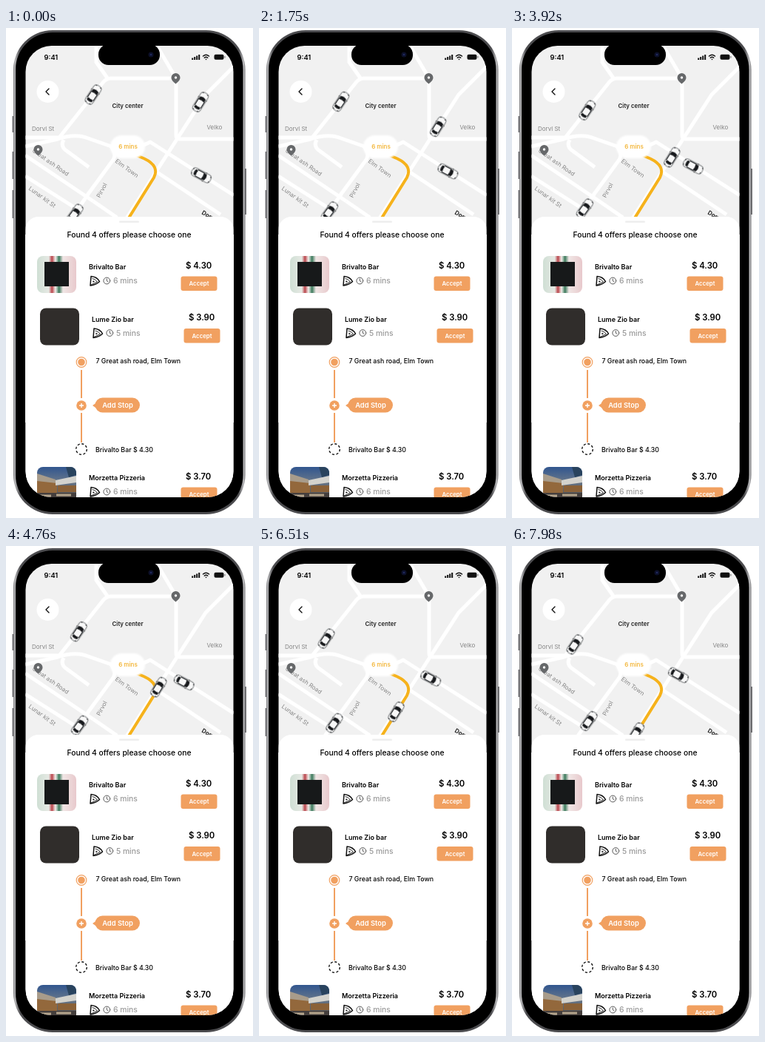
Animation, 334 px wide and 662 px high, one loop 8000 ms. Source, as an HTML page:

```html
<!DOCTYPE html>
<html lang="en">
<head>
<meta charset="utf-8">
<title>Delivery offers</title>
<style>
  html, body { margin: 0; width: 100%; height: 100%; overflow: hidden; background: #fff; }
  svg { display: block; width: 100%; height: 100%; font-family: Inter, Roboto, sans-serif; font-weight: 500; }
  .road { fill: none; stroke: #fff; stroke-width: 5; stroke-linejoin: round; }
  .street { font-size: 8px; font-weight: 400; fill: #858585; }
  .near { font-weight: 600; fill: #111; }
  .name { font-size: 9px; font-weight: 600; }
  .mins { font-size: 10.3px; fill: #999; }
  .price { font-size: 11.3px; font-weight: 600; }
  .label { font-size: 8.8px; }
  .white { fill: #fff; font-weight: 600; }
  .line { fill: none; stroke: #111; stroke-linecap: round; stroke-linejoin: round; }

  .car { animation: drive 8s -1ms infinite; }
  @keyframes drive {
    0% { transform: translate(var(--from)); animation-timing-function: steps(114, end); }
    99.75%, 100% { transform: translate(var(--to)); }
  }
  .north { --from: 118px, 90px; --to: 85px, 133px; }
  .east { --from: 263px, 100px; --to: 168px, 252px; }
  .south { --from: 264px, 199px; --to: 225px, 174.5px; }
  .west { --from: 93px, 251px; --to: 104px, 236.5px; }
</style>
</head>
<body>
<svg viewBox="0 0 334 662">
  <defs>
    <clipPath id="screen"><rect x="26.500" y="24" width="281" height="610" rx="35"/></clipPath>
    <clipPath id="thumb"><rect x="42" y="308" width="53" height="50" rx="8"/></clipPath>
    <linearGradient id="rim">
      <stop offset="0" stop-color="#6d6d70"/><stop offset=".006" stop-color="#b9b9bb"/>
      <stop offset=".03" stop-color="#4c4c4f"/><stop offset=".97" stop-color="#4c4c4f"/>
      <stop offset=".994" stop-color="#b9b9bb"/><stop offset="1" stop-color="#6d6d70"/>
    </linearGradient>
    <linearGradient id="stripes">
      <stop offset="0" stop-color="#cfdfd4"/><stop offset=".3" stop-color="#e6e9e4"/>
      <stop offset=".38" stop-color="#b9434a"/><stop offset=".47" stop-color="#f3efec"/>
      <stop offset=".56" stop-color="#3c7a5c"/><stop offset=".66" stop-color="#f0e6e5"/>
      <stop offset="1" stop-color="#e8c9cc"/>
    </linearGradient>
    <linearGradient id="evening" x2="0" y2="1">
      <stop offset="0" stop-color="#31568f"/><stop offset=".4" stop-color="#66768a"/>
      <stop offset="1" stop-color="#4a4039"/>
    </linearGradient>
    <filter id="soft" x="-20%" y="-20%" width="140%" height="140%"><feGaussianBlur stdDeviation="1"/></filter>

    <g id="car">
      <path d="M-6.6-5h1.4M5.2-5h1.4" stroke="#222" stroke-width="1.6"/>
      <rect x="-5.8" y="-14" width="11.6" height="28" rx="4" fill="#f8f8f8" stroke="#55585b" stroke-width=".8"/>
      <path d="M-4.8-6Q0-9.2 4.8-6L3.7-1.8Q0-3-3.7-1.8Z" fill="#17191c"/>
      <path d="M-4.2 9.8Q0 11.8 4.2 9.8L3.5 6.6Q0 7.4-3.5 6.6Z" fill="#17191c"/>
      <path d="M-4.7-3.8V7.6M4.7-3.8V7.6" stroke="#24272a" stroke-width="1.2"/>
      <path d="M-4.4-12.3l1.8-.9M4.4-12.3l-1.8-.9M-4.3 12.5l2 .7M4.3 12.5l-2 .7" stroke="#3a3c3f" stroke-width="1.1"/>
    </g>
    <g id="pin" fill="#66686a">
      <path d="M0 7.5C-3.2 4.6-6 2.4-6-1A6 6 0 0 1 6-1C6 2.4 3.2 4.6 0 7.5"/>
      <circle cy="-1" r="1.7" fill="#fff"/>
    </g>
    <g id="offer">
      <g class="line">
        <path d="M115 335.500Q123 336 126.500 342.500Q122 347 114 348Z" stroke-width="1.500"/>
        <path d="M117 338.500Q121.500 339.500 123.500 343L115 347" stroke-width=".9"/>
        <circle cx="118.300" cy="342.500" r=".8" fill="#111" stroke-width=".5"/>
        <g stroke="#555"><circle cx="136.300" cy="341.500" r="4.400"/><path d="M136.300 339v2.700l1.700 1"/></g>
      </g>
      <rect x="236.500" y="335.500" width="49" height="19.500" rx="3" fill="#f1a060"/>
      <text class="white" x="261" y="348" font-size="7.800" text-anchor="middle">Accept</text>
    </g>
  </defs>

  <!-- Phone body -->
  <path d="M9.500 119v22M9.500 167v37M9.500 219v38M324 190v62" stroke="#6f6f72" stroke-width="2"/>
  <rect x="10" y="3" width="313.500" height="654" rx="53" fill="url(#rim)"/>
  <rect x="13" y="6" width="307.500" height="648" rx="50" fill="#000"/>

  <g clip-path="url(#screen)">
    <rect x="26" y="24" width="282" height="610" fill="#f1f1f1"/>

    <!-- Map -->
    <g class="road">
      <path d="M26 148H72L130 75Q135 68 142 68H224Q230 68 230 74V145Q230 150 235 150H308"/>
      <path d="M138 69L122 46V24M230 68L204 24"/>
      <path d="M308 52L270 90L230 152L203 194L160 262"/>
      <path d="M26 160L70 150Q94 142 111 149L165 168L195 154L308 226"/>
      <path d="M26 172L118 234M26 200L92 242M78 151Q73 160 82 166L112 188"/>
      <path d="M82 267L112 223L145 178Q150 170 142 160"/>
      <path d="M118 234L150 256M203 194L290 252"/>
    </g>
    <g class="street">
      <text x="35" y="139">Dorvl St</text>
      <text x="271.500" y="137">Velko</text>
      <text transform="translate(35 167) rotate(35)">Great ash Road</text>
      <text transform="translate(30 218) rotate(36)">Lunar kit St</text>
      <text transform="translate(127 230) rotate(-62)">Pirvol</text>
      <text transform="translate(147 181) rotate(36)">Elm Town</text>
      <text class="near" transform="translate(264 251) rotate(30)">Dorvl St</text>
    </g>
    <text x="143.500" y="108" font-size="7.900" font-weight="600" fill="#222">City center</text>
    <path d="M160 165L187 176.500Q208 186.500 200 202L162 263" fill="none" stroke="#f6b21b" stroke-width="4"/>
    <g fill="#fff">
      <rect x="141" y="145" width="47" height="31" rx="15.500" filter="url(#soft)"/>
      <circle cx="56.500" cy="86" r="15"/>
    </g>
    <text x="165" y="163" font-size="8" font-weight="600" fill="#f3b73c" text-anchor="middle">6 mins</text>
    <use href="#pin" x="229.500" y="68"/>
    <use href="#pin" x="43.500" y="165"/>
    <path class="line" d="M58 82l-4 4 4 4" stroke-width="1.400"/>

    <g class="car north"><use href="#car" transform="rotate(34)"/></g>
    <g class="car east"><use href="#car" transform="rotate(32)"/></g>
    <g class="car south"><use href="#car" transform="rotate(118)"/></g>
    <g class="car west"><use href="#car" transform="rotate(36)"/></g>

    <!-- Status bar -->
    <text x="51.500" y="43.300" font-size="9.300" font-weight="600">9:41</text>
    <rect x="125" y="22" width="83" height="28" rx="13.500"/>
    <circle cx="196" cy="36" r="3.500" fill="#0c1029"/>
    <circle cx="196" cy="36" r="1.300" fill="#202a60"/>
    <path d="M252.200 43v-2.500M255.200 43v-4M258.200 43v-5.500M261.200 43v-7" stroke="#111" stroke-width="2"/>
    <g class="line" stroke-width="1.500">
      <path d="M266.500 38Q270.500 34.500 274.500 38M268.300 40.200Q270.500 38.300 272.700 40.200M270.500 42.300v.1"/>
    </g>
    <rect x="281.500" y="35.700" width="13" height="7" rx="2" fill="#111"/>
    <path d="M296 38v2.500" stroke="#777"/>

    <!-- Offers sheet -->
    <rect x="26" y="255" width="282" height="400" rx="18" fill="#fff"/>
    <rect x="153" y="260.500" width="27" height="2.500" rx="1.250" fill="#eee"/>
    <text x="166.500" y="283" font-size="10.350" text-anchor="middle">Found 4 offers please choose one</text>

    <g>
      <g clip-path="url(#thumb)">
        <path d="M42 308h53v50H42z" fill="url(#stripes)"/>
        <path d="M52 316h33v33H52z" fill="#17191a"/>
      </g>
      <text class="name" x="112" y="326">Brivalto Bar</text>
      <text class="mins" x="145" y="345">6 mins</text>
      <text class="price" x="243" y="324.500">$ 4.30</text>
      <use href="#offer"/>
    </g>
    <g transform="translate(4 70.500)">
      <rect x="42" y="308" width="53" height="50" rx="8" fill="#302d2b"/>
      <text class="name" x="112" y="326">Lume Zio bar</text>
      <text class="mins" x="145" y="345">5 mins</text>
      <text class="price" x="243" y="324.500">$ 3.90</text>
      <use href="#offer"/>
    </g>
    <g transform="translate(0 285)">
      <g clip-path="url(#thumb)">
        <path d="M42 308h53v50H42z" fill="url(#evening)"/>
        <path d="M42 317l25 8v19H42z" fill="#a89c8b"/>
        <path d="M42 327l27 3v13H42z" fill="#93683c"/>
        <path d="M67 326l28-6v9l-28 4z" fill="#d3d2cd"/>
        <path d="M70 333h25v9H70z" fill="#8a6138"/>
        <path d="M81 308h14v11l-10 3z" fill="#29435e"/>
        <path d="M42 343h53v15H42z" fill="#453f3d"/>
        <path d="M47 347h14M68 346h20" stroke="#b5a58c" stroke-width="3"/>
      </g>
      <text class="name" x="112" y="326">Morzetta Pizzeria</text>
      <text class="mins" x="145" y="345">6 mins</text>
      <text class="price" x="243" y="324.500">$ 3.70</text>
      <use href="#offer"/>
    </g>

    <!-- Route stops -->
    <path d="M102 462v38M102 520v40" stroke="#f1a060" stroke-width="2"/>
    <circle cx="102" cy="451.500" r="6.800" fill="#fff" stroke="#f1a060" stroke-width="1.200"/>
    <circle cx="102" cy="451.500" r="4.800" fill="#f1a060"/>
    <circle cx="102" cy="510" r="6.800" fill="#f1a060"/>
    <path d="M99 510h6M102 507v6" stroke="#fff" stroke-width="1.400"/>
    <circle cx="102" cy="569" r="7.300" fill="none" stroke="#111" stroke-width="1.400" stroke-dasharray="3.200 2.534"/>
    <path d="M117 510l7-5v10z" fill="#f1a060"/>
    <rect x="120.500" y="499.500" width="60.500" height="20" rx="10" fill="#f1a060"/>
    <text class="white" x="151" y="513.300" font-size="9.400" text-anchor="middle">Add Stop</text>
    <text class="label" x="121.500" y="452.500">7 Great ash road, Elm Town</text>
    <text class="label" x="121" y="573">Brivalto Bar $ 4.30</text>
  </g>
</svg>
</body>
</html>
```
